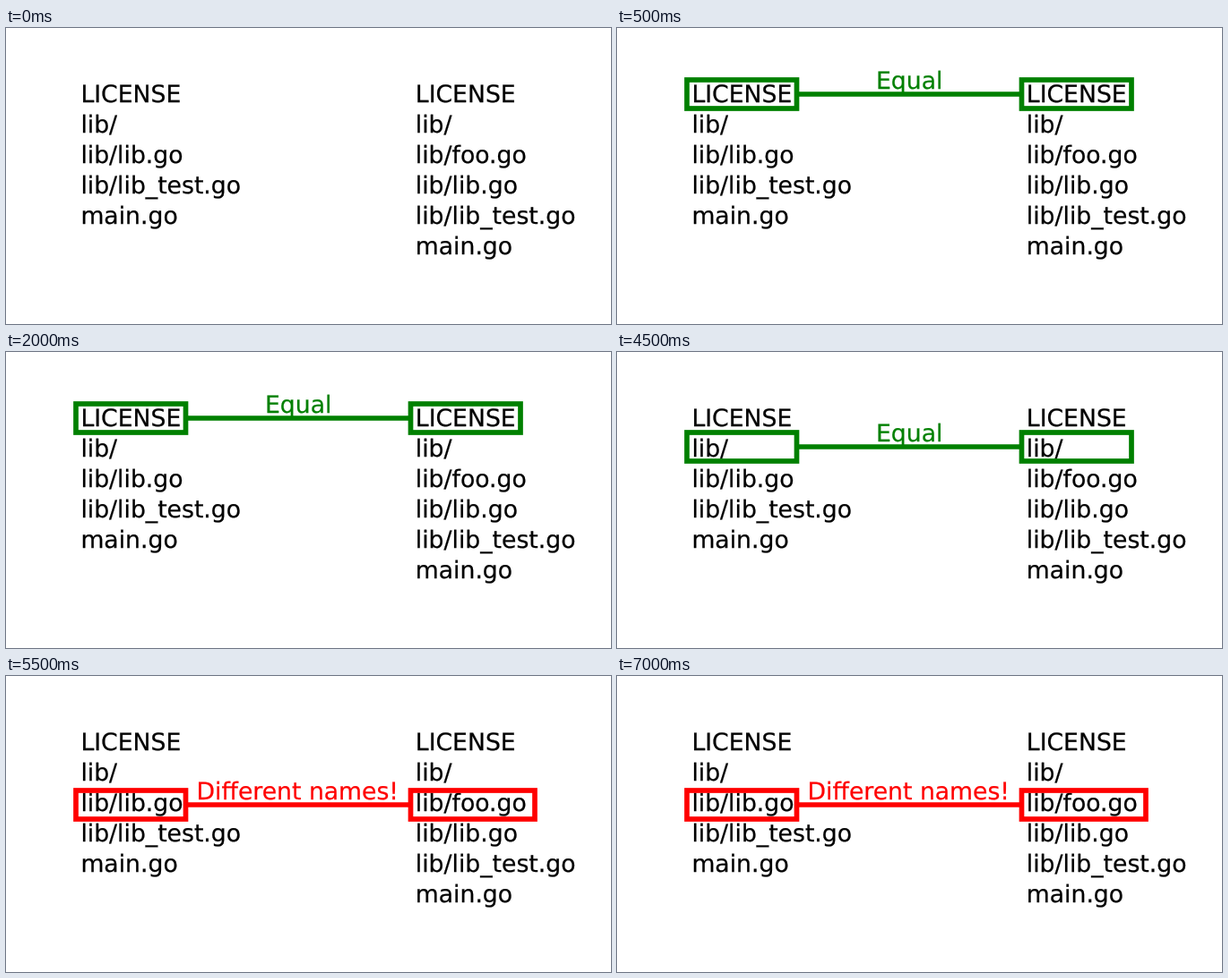
Recreate the animation shown at these times as an HTML page. Size 675 px wide and 331 px high, loop 8000 ms.

```html
<!DOCTYPE html>
<html lang="en">
<head>
<meta charset="utf-8">
<style>
  html, body { margin: 0; height: 100%; overflow: hidden; background: #fff; }
  svg { display: block; width: 675px; height: 331px; font: 26.667px "DejaVu Sans", sans-serif; }
  rect, path { fill: none; stroke: currentColor; stroke-width: 5.7; }
  text { fill: currentColor; stroke: currentColor; stroke-width: .25; text-rendering: geometricPrecision; }
</style>
</head>
<body>
<svg viewBox="0 0 675 331">
  <g id="lists"></g>
  <g id="match">
    <path/>
    <rect x="78" width="122.5" height="32"/>
    <rect x="451.5" height="32"/>
    <text></text>
  </g>
</svg>
<script>
const LOOP = 8000;
const columns = [
  { x: 83.4, names: ["LICENSE", "lib/", "lib/lib.go", "lib/lib_test.go", "main.go"] },
  { x: 456.8, names: ["LICENSE", "lib/", "lib/foo.go", "lib/lib.go", "lib/lib_test.go", "main.go"] },
];
const equal = { color: "#008000", label: "Equal", x: 289, width: 122.5 };
const different = { color: "#f00", label: "Different names!", x: 212.6, width: 138.5 };
const steps = [
  { at: 500, y: 74, ...equal },
  { at: 3000, y: 106, ...equal },
  { at: 5500, y: 144, ...different },
];

document.getElementById("lists").innerHTML = columns.map(({ x, names }) =>
  names.map((name, i) => `<text x="${x}" y="${83 + i * 33.9}">${name}</text>`).join("")
).join("");

const match = document.getElementById("match");
const [line, leftBox, rightBox, label] = match.children;

function draw(now) {
  const time = now % LOOP;
  const step = steps.findLast(s => time >= s.at);
  match.style.display = step ? "" : "none";
  if (step) {
    match.style.color = step.color;
    line.setAttribute("d", `M200.5 ${step.y}H451.5`);
    for (const box of [leftBox, rightBox]) box.setAttribute("y", step.y - 16);
    rightBox.setAttribute("width", step.width);
    label.setAttribute("x", step.x);
    label.setAttribute("y", step.y - 6.5);
    label.textContent = step.label;
  }
  requestAnimationFrame(draw);
}
requestAnimationFrame(draw);
</script>
</body>
</html>
```
